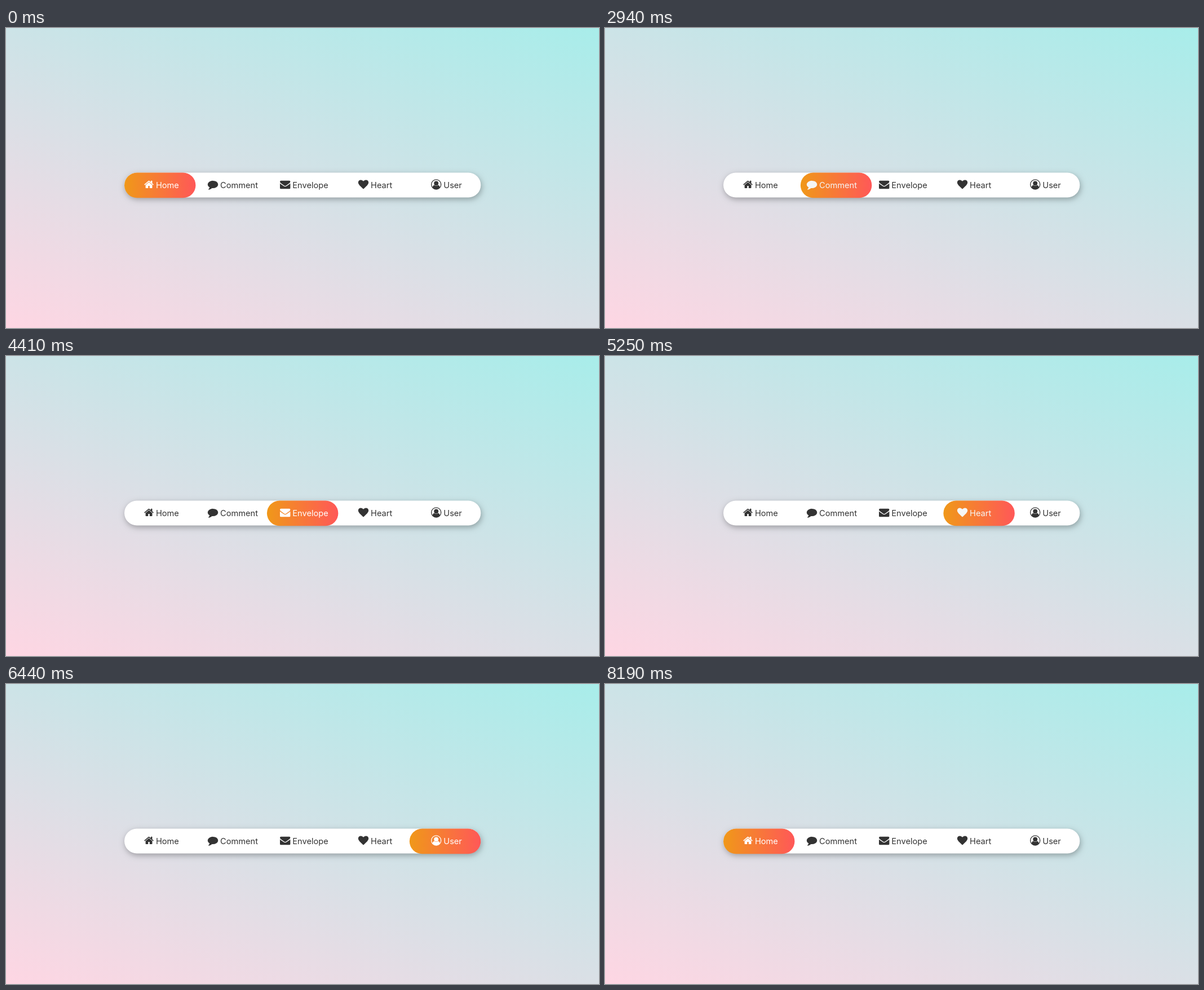
Recreate the animation shown at these times as an HTML page with a canvas. Size 1052 px wide and 532 px high, loop 9.66 s.

```html
<!DOCTYPE html>
<html lang="en">
<head>
<meta charset="utf-8">
<title>Sliding tab bar</title>
<style>
  html, body { margin: 0; width: 100%; height: 100%; overflow: hidden; }
  canvas { display: block; width: 1052px; height: 532px; }
</style>
</head>
<body>
<canvas id="stage" width="1052" height="532"></canvas>
<script>
const canvas = document.getElementById('stage');
const ctx = canvas.getContext('2d');
const W = canvas.width, H = canvas.height;

const LOOP = 9660, TICK = 70, TICK_ELAPSED = 67, SLIDE = 600;
const BAR = { x: 210, y: 256.5, w: 632.3, h: 44 };
const TAB_W = BAR.w / 5, PILL_H = 44.8;
const BASELINE = 284, ICON = 18.4, UNIT = ICON / 1792, GAP = 3.9;
const DARK = 51;

// Icon outlines on a 1792-unit square with the baseline at 1536.
const shapes = {
  home: `M1408 992V1472Q1408 1536 1344 1536H960V1152H704V1536H320Q256 1536 256 1472V992L832 515Z
    M1631 923L1569 997Q1547 1017 1524 1001L832 424L140 1001Q117 1017 95 997L33 923
    Q17 898 37 878L756 279Q832 227 908 279L1152 483V288Q1152 256 1184 256H1376Q1408 256 1408 288V696
    L1627 878Q1647 898 1631 923Z`,
  comment: `M1792 896A896 640 0 0 1 751 1528Q553 1703 291 1770Q240 1784 177 1792Q140 1792 129 1754
    Q122 1735 150 1705C250 1600 285 1570 338 1398A896 640 0 1 1 1792 896Z`,
  envelope: `M1792 710V1504Q1792 1664 1632 1664H160Q0 1664 0 1504V710Q44 759 101 797L598 1142
    Q780 1280 896 1280Q1012 1280 1194 1142L1691 797Q1748 758 1792 710Z
    M1792 416Q1792 570 1621 690L1153 1015C1060 1083 970 1152 896 1152C822 1152 732 1083 639 1015
    L172 690Q0 560 0 438Q0 256 160 256H1632Q1792 256 1792 416Z`,
  heart: `M896 1664Q870 1664 852 1646L228 1044Q0 810 0 596C0 300 170 128 478 128
    C640 128 790 240 896 344C1002 240 1152 128 1314 128C1622 128 1792 300 1792 596Q1792 810 1564 1044
    L940 1646Q922 1664 896 1664Z`,
  user: `M0 896A896 896 0 1 1 1792 896A896 896 0 1 1 0 896Z
    M277 1351A768 768 0 1 1 1515 1351Q1449 1024 1209 1024Q1078 1152 896 1152Q714 1152 583 1024
    Q343 1024 277 1351Z
    M512 704A384 384 0 1 1 1280 704A384 384 0 1 1 512 704Z`
};

const tab = (label, shape, x, advance = 1792) =>
  ({ label, x, textX: x + advance * UNIT + GAP, icon: new Path2D(shapes[shape]) });

const tabs = [
  tab('Home', 'home', 245, 1664),
  tab('Comment', 'comment', 357.8),
  tab('Envelope', 'envelope', 486),
  tab('Heart', 'heart', 624.8),
  tab('User', 'user', 754)
];

// lag: time already elapsed when the first step of a slide appears
const slides = [
  { at: 2520, from: 0, to: 1, lag: 34 },
  { at: 3780, from: 1, to: 2, lag: 48 },
  { at: 4830, from: 2, to: 3, lag: 42 },
  { at: 5810, from: 3, to: 4, lag: 42 },
  { at: 7560, from: 4, to: 0, lag: 42 }
];

function cubicBezier(x1, y1, x2, y2) {
  const axis = (a, b, s) => 3 * s * (1 - s) ** 2 * a + 3 * s * s * (1 - s) * b + s ** 3;
  return x => {
    if (x <= 0) return 0;
    if (x >= 1) return 1;
    let lo = 0, hi = 1;
    for (let i = 0; i < 30; i++) {
      const mid = (lo + hi) / 2;
      if (axis(x1, x2, mid) < x) lo = mid; else hi = mid;
    }
    return axis(y1, y2, lo);
  };
}
const easeBack = cubicBezier(0.68, -0.55, 0.265, 1.55);
const ease = cubicBezier(0.25, 0.1, 0.25, 1);

function poseAt(time) {
  const slide = slides.filter(s => s.at <= time).pop();
  if (!slide) return { position: 0, active: 0, glow: 1 };
  const step = Math.floor((time - slide.at) / TICK);
  const progress = (step * TICK_ELAPSED + slide.lag) / SLIDE;
  return {
    position: slide.from + (slide.to - slide.from) * easeBack(progress),
    active: slide.to,
    glow: ease(progress)
  };
}

function gradient(x0, y0, x1, y1, start, end) {
  const g = ctx.createLinearGradient(x0, y0, x1, y1);
  g.addColorStop(0, start);
  g.addColorStop(1, end);
  return g;
}

function capsule(x, y, w, h, fill) {
  ctx.beginPath();
  ctx.roundRect(x, y, w, h, h / 2);
  ctx.fillStyle = fill;
  ctx.fill();
}

function drawBackground() {
  const angle = 200 * Math.PI / 180;
  const dx = Math.sin(angle), dy = -Math.cos(angle);
  const half = (Math.abs(W * dx) + Math.abs(H * dy)) / 2;
  ctx.fillStyle = gradient(W / 2 - dx * half, H / 2 - dy * half,
    W / 2 + dx * half, H / 2 + dy * half, '#a8edea', '#fed6e3');
  ctx.fillRect(0, 0, W, H);
}

function drawBar() {
  ctx.save();
  ctx.shadowColor = 'rgba(0, 0, 0, 0.3)';
  ctx.shadowBlur = 11;
  ctx.shadowOffsetX = 1.5;
  ctx.shadowOffsetY = 3.5;
  capsule(BAR.x, BAR.y, BAR.w, BAR.h, '#fff');
  ctx.restore();
}

function drawPill(position) {
  const x = BAR.x + position * TAB_W;
  capsule(x, BAR.y, TAB_W, PILL_H, gradient(x, 0, x + TAB_W, 0, '#f09819', '#ff5858'));
}

function drawTab({ label, x, textX, icon }, glow) {
  const level = Math.round(DARK + (255 - DARK) * glow);
  ctx.fillStyle = `rgb(${level}, ${level}, ${level})`;
  ctx.fillText(label, textX, BASELINE);
  ctx.save();
  ctx.translate(x, BASELINE - 1536 * UNIT);
  ctx.scale(UNIT, UNIT);
  ctx.fill(icon, 'evenodd');
  ctx.restore();
}

function render(now) {
  const { position, active, glow } = poseAt(now % LOOP);
  drawBackground();
  drawBar();
  drawPill(position);
  ctx.font = '14.6px Inter, Roboto, sans-serif';
  tabs.forEach((item, i) => drawTab(item, i === active ? glow : 0));
  requestAnimationFrame(render);
}
render(performance.now());
</script>
</body>
</html>
```
